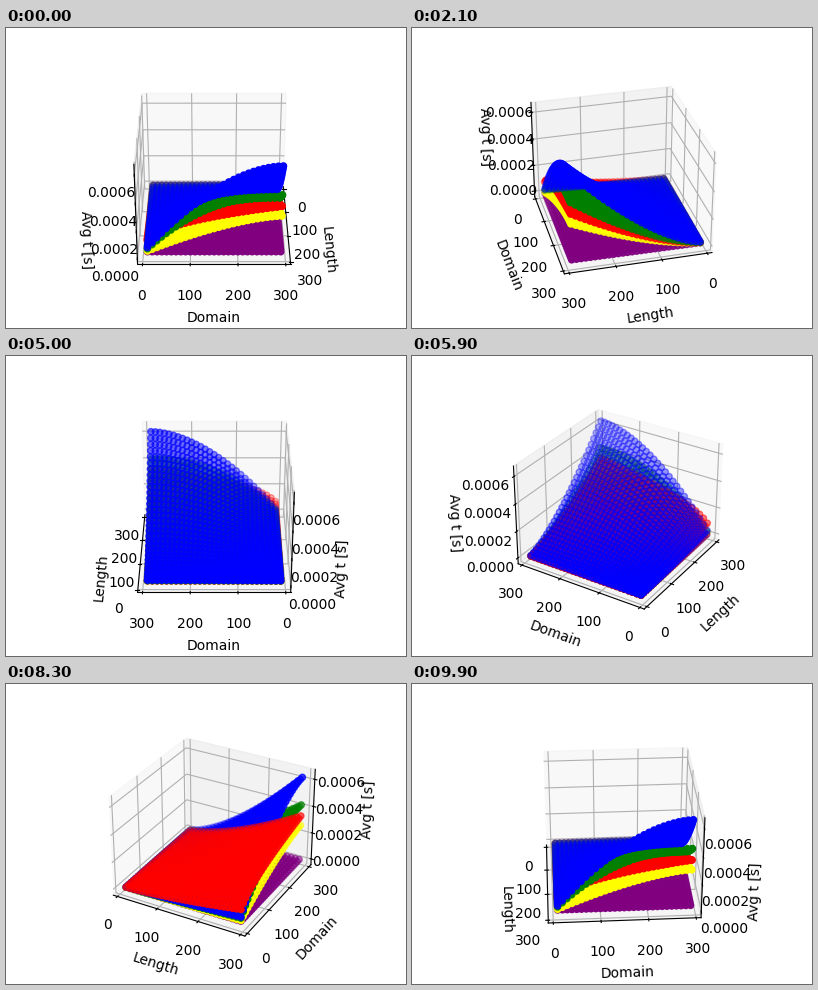
A matplotlib script that plays this animation: 400x300 px, repeating every 10 s.

```python
import numpy as np
import matplotlib.pyplot as plt
from matplotlib.animation import FuncAnimation

FRAMES = 100
TOP = 290

sizes = np.arange(10, 300, 10)
length, domain = (g.ravel() for g in np.meshgrid(sizes, sizes, indexing="ij"))
u = length / TOP
v = domain / TOP


def saturating(peak, p):
    """Grows with length, levels off towards large domains."""
    return peak * u**1.5 * (1 - (1 - v)**p)


series = {
    "purple": 1e-6 + 9e-6 * u,
    "yellow": 1e-6 + saturating(2.72e-4, 1.5),
    "red": 1e-6 + 3.42e-4 * u**1.5 * v**0.38,
    "green": 1e-6 + saturating(4.24e-4, 2.2),
    "blue": 3e-6 + saturating(6.24e-4, 1.78),
}

fig = plt.figure(figsize=(4, 3), dpi=100)
ax = fig.add_subplot(projection="3d")
for color, avg in series.items():
    ax.scatter(length, domain, avg, c=color)
ax.set_xlabel("Length")
ax.set_ylabel("Domain")
ax.set_zlabel("Avg t [s]")


def update(i):
    ax.view_init(elev=30, azim=i * 360 / FRAMES)
    return ()


anim = FuncAnimation(fig, update, frames=FRAMES, interval=100,
                     init_func=lambda: (), repeat=True, repeat_delay=0)
plt.show()
```
